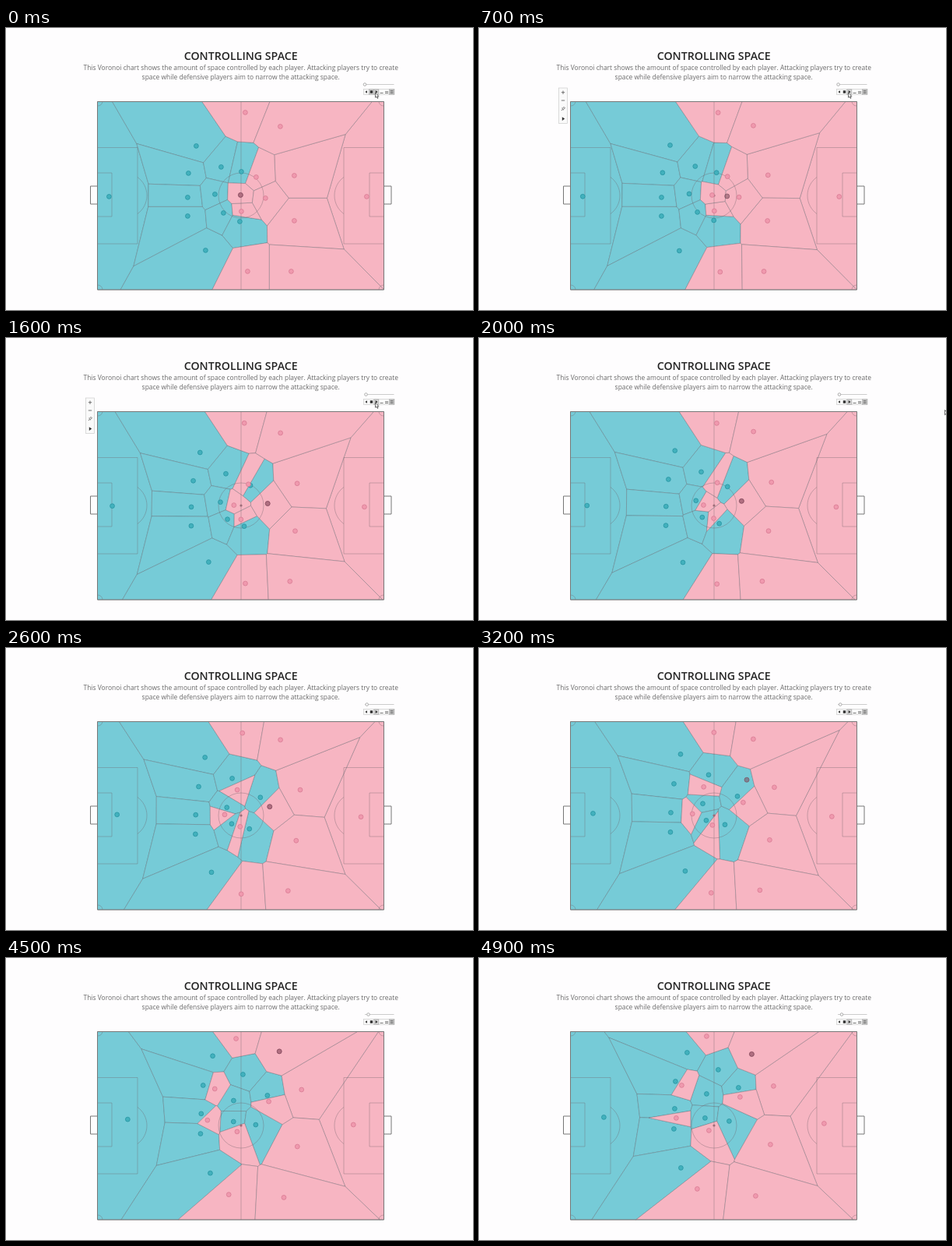
An HTML page for the animation above (5 s loop, 600 by 362 pixels).

```html
<!DOCTYPE html>
<html lang="en">
<head>
<meta charset="utf-8">
<title>Controlling Space</title>
<style>
  html, body { margin: 0; width: 100%; height: 100%; overflow: hidden; background: #fefdfe; }
  svg { display: block; width: 100vw; height: 100vh; }
  text { font-family: "Open Sans", "Noto Sans", sans-serif; text-anchor: middle; }
  .title { font-size: 14.2px; font-weight: 600; fill: #252525; }
  .note { font-size: 8.46px; fill: #6a6a6a; }
  .cell { stroke: #50555c; stroke-opacity: .55; stroke-width: .6; stroke-linejoin: round; }
  .blue { fill: #76cbd7; }
  .pink { fill: #f7b5c2; }
  .dot { stroke-width: .8; }
  .dot.blue { fill: #42b1bd; stroke: #2795a2; }
  .dot.pink { fill: #f099ae; stroke: #d97b93; }
  #ball { fill: #7d4c5c; fill-opacity: .55; stroke: #7d4c5c; stroke-width: .7; }
  .lines { fill: none; stroke: #6d5f68; stroke-opacity: .45; stroke-width: .8; }
  .frame { fill: none; stroke: #777; }
  .box { fill: #fafafa; stroke: #ccc; stroke-width: .7; }
  .on { fill: #d8d8d8; stroke: #aaa; }
  .icon { fill: #333; }
  .mark { fill: none; stroke: #555; stroke-width: .8; }
</style>
</head>
<body>
<svg viewBox="0 0 600 362">
  <text class="title" x="301.7" y="41.2">CONTROLLING SPACE</text>
  <text class="note" x="301.7" y="54.2">This Voronoi chart shows the amount of space controlled by each player. Attacking players try to create</text>
  <text class="note" x="301.7" y="66.2">space while defensive players aim to narrow the attacking space.</text>

  <g id="cells"></g>
  <g class="lines">
    <path d="M302 94V336M118 153.5H169V277H118M118 186H136V242H118M485 153.5H434V277H485M485 186H467V242H485"/>
    <path d="M169 191.5A29 29 0 0 1 169 238.5M434 191.5A29 29 0 0 0 434 238.5"/>
    <path d="M124 94A6 6 0 0 1 118 100M479 94A6 6 0 0 0 485 100M118 330A6 6 0 0 1 124 336M485 330A6 6 0 0 0 479 336"/>
    <circle cx="302" cy="215" r="29"/>
  </g>
  <circle cx="302" cy="215" r="1.6" fill="#9c6c78"/>
  <path class="frame" d="M117.5 94.5H485.5V336H117.5ZM117.5 203H108.5V226H117.5M485.5 203H495V226H485.5"/>
  <g id="dots"></g>
  <circle id="ball" r="3"/>

  <path d="M461 72.5H498.5" stroke="#ccc"/>
  <circle id="knob" cy="72.5" r="1.8" fill="#fff" stroke="#999" stroke-width=".8"/>
  <rect class="box" x="459.5" y="78.5" width="39.5" height="7"/>
  <rect class="box on" id="stop" x="466.3" y="78.8" width="6" height="6.4"/>
  <rect class="box on" x="472.8" y="78.8" width="6" height="6.4"/>
  <rect class="box on" x="492.5" y="78.8" width="6.2" height="6.4"/>
  <path class="icon" d="M464 80.2V83.8L461.4 82ZM467.8 80.3H471.2V83.7H467.8ZM474.7 80V84L477.6 82Z"/>
  <path class="mark" d="M480.6 83.5H484.6M487 83.5H491.2M487 81.7H491.2M493.6 83.6H497.6M493.6 82H497.6M493.6 80.4H497.6"/>

  <g id="tools">
    <rect class="box" x="102.5" y="77" width="11" height="45.5"/>
    <path class="mark" d="M105.8 82.7H110.2M108 80.5V84.9M105.8 93H110.2"/>
    <path class="mark" d="M106 106L107.6 104.2M106.4 102.8L109 105.4M107.4 103.2L109 101.4L110.4 102.8L108.6 104.4"/>
    <path class="icon" d="M106.8 114.2V119L110.2 116.6Z"/>
  </g>
  <path id="cursor" d="M0 0V6.2L1.5 5L2.6 7.4L3.6 6.9L2.6 4.7H4.5Z" fill="#fff" stroke="#333" stroke-width=".7"/>
</svg>
<script>
const LOOP = 5000;
const PAUSES = [14, 27, 38, 40];   // ticks of 100 ms without movement
const STEPS = 43;

// Each run: start x, y; sideways bend x, y; end x, y
const blueRuns = [
  [132,216, 0,2, 160,204], [244,151, 3,0, 267,121], [234,186, 7,2, 252,158],
  [233,217, 4,6, 251,193], [233,241, 4,6, 250,219], [256,285, 7,9, 259,269],
  [276,178, 3,2, 307,143], [268,213, 7,6, 292,174], [279,237, 7,0, 290,205],
  [300,248, 5,-2, 321,209], [302,184, 14,15, 333,166]
];
const pinkRuns = [
  [463,216, 0,2, 443,212], [307,108, 2,4, 292,100], [370,189, 5,2, 378,164],
  [321,191, -2,1, 260,163], [302,235, 1,-1, 295,221], [370,247, 1,3, 374,239],
  [310,312, 3,10, 280,296], [366,312, 0,2, 355,305]
];
// The three who pass the ball on
const passer = [301,214, -3,3, 253,205];
const carrier = [333,218, 5,0, 335,178];
const receiver = [352,126, 1,-8, 350,123];

const $ = id => document.getElementById(id);
const ramp = (v, from, to) => Math.min(1, Math.max(0, (v - from) / (to - from)));
const mix = (a, b, f) => a.map((v, i) => v + (b[i] - v) * f);

function add(parent, tag, attrs) {
  const el = document.createElementNS("http://www.w3.org/2000/svg", tag);
  for (const k in attrs) el.setAttribute(k, attrs[k]);
  return parent.appendChild(el);
}

const makePlayer = team => run => ({
  run,
  cell: add($("cells"), "path", { class: "cell " + team }),
  dot: add($("dots"), "circle", { class: "dot " + team, r: 2.9 })
});
const players = [
  ...blueRuns.map(makePlayer("blue")),
  ...[...pinkRuns, passer, carrier, receiver].map(makePlayer("pink"))
];

// Curved run that starts slowly and speeds up
function at([x, y, bendX, bendY, endX, endY], step) {
  const w = (step / STEPS) ** 1.6, arc = 4 * w * (1 - w);
  const [px, py] = mix([x, y], [endX, endY], w);
  return [px + bendX * arc + .4, py + bendY * arc + .4];
}

function ballAt(step) {
  const [a, b, c] = [passer, carrier, receiver].map(run => at(run, step));
  return mix(mix(a, b, ramp(step, 0, 9)), c, ramp(step, 23, 37));
}

// Keep the part of a polygon that is nearer to a than to b
function clip(poly, a, b) {
  const nx = b[0] - a[0], ny = b[1] - a[1], mid = mix(a, b, .5);
  const side = p => (p[0] - mid[0]) * nx + (p[1] - mid[1]) * ny;
  const out = [];
  poly.forEach((p, i) => {
    const q = poly[(i + 1) % poly.length], s = side(p), r = side(q);
    if (s <= 0) out.push(p);
    if (s * r < 0) out.push(mix(p, q, s / (s - r)));
  });
  return out;
}

function place(el, [x, y]) {
  el.setAttribute("cx", x);
  el.setAttribute("cy", y);
}

function draw(tick) {
  const step = Math.max(0, tick - 2 - PAUSES.filter(p => tick >= p).length);
  const spots = players.map(p => at(p.run, step));
  players.forEach((p, i) => {
    let poly = [[117.5, 94.5], [485.5, 94.5], [485.5, 336], [117.5, 336]];
    spots.forEach((s, j) => { if (j !== i) poly = clip(poly, spots[i], s); });
    p.cell.setAttribute("d", "M" + poly.join("L") + "Z");
    place(p.dot, spots[i]);
  });
  place($("ball"), ballAt(step));
  $("knob").setAttribute("cx", 461 + 5 * step / STEPS);

  const show = (id, on) => $(id).setAttribute("visibility", on ? "visible" : "hidden");
  show("stop", tick < 3);
  show("tools", tick >= 5 && tick < 20);
  show("cursor", tick <= 20);
  const [x, y] = mix([474.5, 83], [598.5, 92.5], ramp(tick, 17, 20));
  $("cursor").setAttribute("transform", `translate(${x} ${y})`);
}

let last = -1;
function frame() {
  const tick = Math.floor(performance.now() % LOOP / 100);
  if (tick !== last) draw(last = tick);
  requestAnimationFrame(frame);
}
frame();
</script>
</body>
</html>
```
